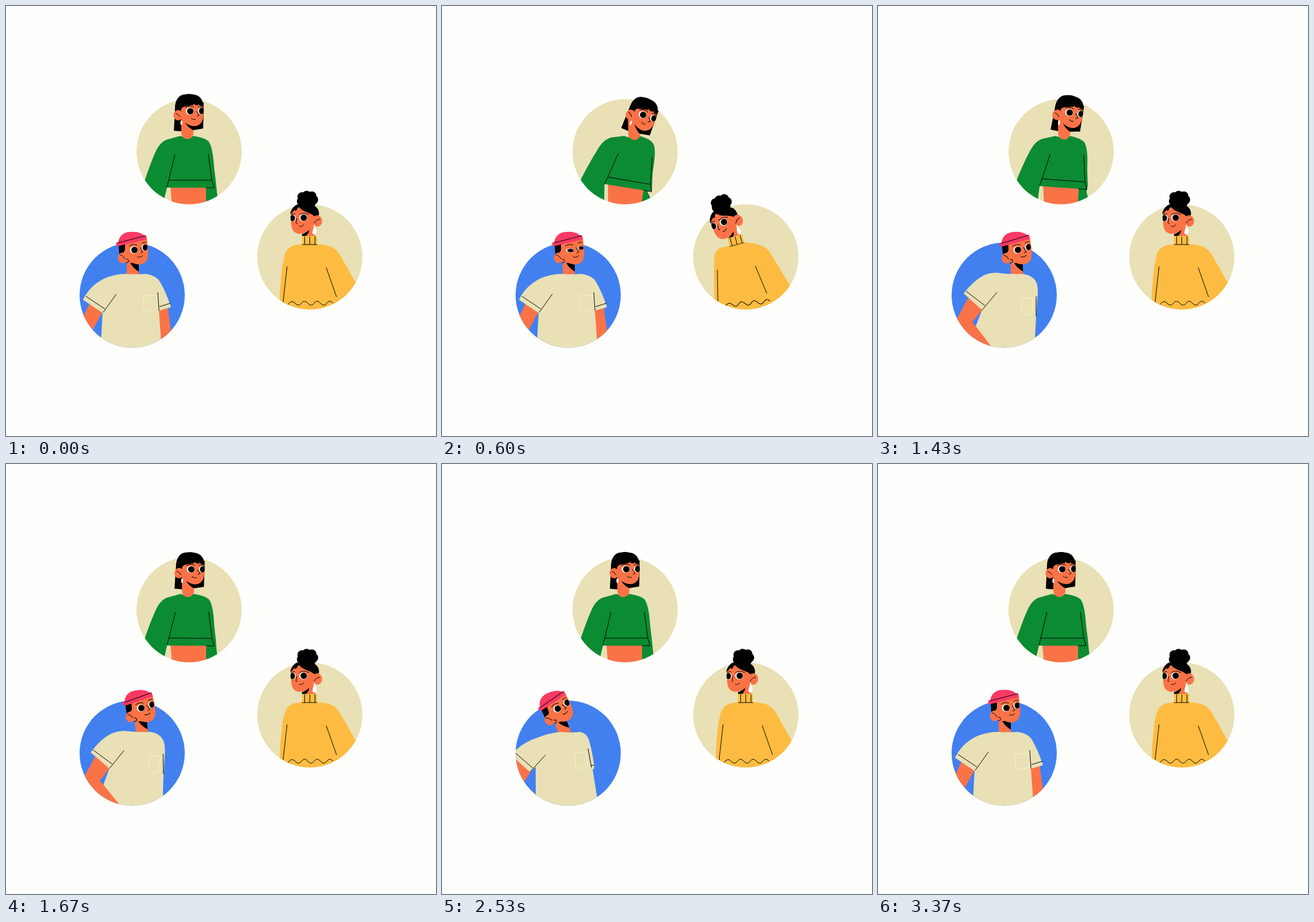
Write an HTML page with a canvas that moves like this. It is 748 by 748 pixels and loops after 3410 ms.

```html
<!DOCTYPE html>
<html lang="en">
<head>
<meta charset="utf-8">
<title>Three people</title>
<style>
html, body { margin: 0; width: 100%; height: 100%; overflow: hidden; background: #fefefd; }
canvas { display: block; }
</style>
</head>
<body>
<canvas id="stage" width="748" height="748"></canvas>
<script>
const ctx = document.getElementById('stage').getContext('2d');
const LOOP = 3410, RADIUS = 91.5;
const CREAM = '#e9e0b5', GREEN = '#0b8b32', SKIN = '#fa7347', BLUE = '#4280f0',
      PINK = '#fb3a64', YELLOW = '#fdbc41', BLACK = '#000', WHITE = '#fff';

const lerp = (a, b, k) => a + (b - a) * k;

// Eased value of a [time, value] track
function track(keys, t) {
  const i = keys.findIndex(key => key[0] > t);
  if (i < 0) return keys[keys.length - 1][1];
  if (i === 0) return keys[0][1];
  const [t0, a] = keys[i - 1], [t1, b] = keys[i];
  const u = (t - t0) / (t1 - t0);
  return lerp(a, b, u * u * (3 - 2 * u));
}

// Blends two paths that share the same commands
function mix(from, to, k) {
  const ends = to.match(/-?[\d.]+/g);
  let i = 0;
  return from.replace(/-?[\d.]+/g, n => lerp(+n, +ends[i++], k).toFixed(2));
}

// Blends along a row of poses; the position 1.5 lies between poses 1 and 2
function along(poses, p) {
  const i = Math.min(Math.floor(p), poses.length - 2);
  return mix(poses[i], poses[i + 1], p - i);
}

function fill(path, color) {
  ctx.fillStyle = color;
  ctx.fill(new Path2D(path));
}

function line(path, color = BLACK, width = 1) {
  ctx.strokeStyle = color;
  ctx.lineWidth = width;
  ctx.stroke(new Path2D(path));
}

function oval(x, y, rx, ry, color) {
  ctx.fillStyle = color;
  ctx.beginPath();
  ctx.ellipse(x, y, rx, ry, 0, 0, 7);
  ctx.fill();
}

function posed(dx, dy, degrees, px, py, draw) {
  ctx.save();
  ctx.translate(px + dx, py + dy);
  ctx.rotate(degrees * Math.PI / 180);
  ctx.translate(-px, -py);
  draw();
  ctx.restore();
}

// Figures are cut by the lower half of their disc and may rise above it
function portrait(x, y, color, draw) {
  oval(x, y, RADIUS, RADIUS, color);
  ctx.save();
  ctx.beginPath();
  ctx.arc(x, y, RADIUS, 0, Math.PI);
  ctx.lineTo(x - RADIUS, y - 150);
  ctx.lineTo(x + RADIUS, y - 150);
  ctx.clip();
  draw();
  ctx.restore();
}

const blink = (t, ...times) =>
  Math.max(0, ...times.map(time => 1 - Math.abs(t - time) / 110));

// Eye: white x, y, rx, ry, then pupil x and rx
function eyes(face, list, closed, lids) {
  if (closed > 0.85) return line(lids);
  const open = 1 - closed;
  ctx.save();
  ctx.clip(new Path2D(face));
  for (const [x, y, rx, ry, pupil, pr] of list) {
    oval(x, y + closed * 2, rx, ry * open, WHITE);
    oval(pupil, y + closed * 2, pr, 5.5 * open, BLACK);
  }
  ctx.restore();
}

function greenWoman(t) {
  const k = track([[0, 0], [80, -.03], [520, .9], [1070, 1], [1180, 1], [1600, .06], [1900, 0]], t);
  const head = draw => posed(21 * k, 4 * k, 21 * k, 317.5, 215, draw);

  fill(mix('M286 314L348 314L348 350L289 350Z', 'M289 308L352 318L347 350L289 350Z', k), SKIN);
  fill(mix(
    'M303 226Q315 231 326 226Q345 229 352 235C358 242 361 262 362 280L365 305L367 325L369 340L348 343L348 316L280 316L273 345L236 320Q252 270 262 250Q268 238 278 233Z',
    'M318 226Q333 232 345 226Q364 231 369 240C374 248 371 270 367 290L365 324L356 322L365 340L347 343L351 321L283 309L283 345L233 318Q253 279 272 249Q283 230 298 228Z', k), GREEN);
  line(mix(
    'M294 258L283 303L280 315M283 303L358 303M352 257L358 303L362 316L348 316',
    'M308 256L289 297L283 309M289 297L363 311M367 263L363 311L365 324L351 321', k));

  head(() => fill('M292 217L294 178C294 161 303 154 311 154Q318 152 326 154C338 155 344 165 344 178L343 213L318 215L304 218Z', BLACK));
  ctx.lineCap = 'round';
  line(mix('M315.5 198L315.5 221', 'M336 198L336.5 223', k), SKIN, 21);
  ctx.lineCap = 'butt';
  head(() => {
    fill('M311 202Q320 211 343 205L343 213L326 216Q317 212 311 202Z', BLACK);
    fill('M304 170L343 170C344 190 345 201 335 207C327 212 315 207 305 198Z', SKIN);
    eyes('M304 168H344V212H304Z', [[319.7, 183, 6.9, 6.3, 320.6, 5.6], [339, 182.5, 5, 6, 340, 4.3]],
      blink(t, 1110, 1970), 'M313 184q7 4 13 -1M334 183q5 3 9 -1');
    fill('M301 180L305 168L344 168L343 175L336 173L335 170L334 173L328 172L327 167L326 172L311 175Q305 176 304 182Z', BLACK);
    line('M312 177Q319 172 327 176M334 176Q339 174 343 177M331 183L336 190L332 192M322 195Q325 199 330 197');
    oval(299.5, 190, 8.2, 9, SKIN);
    line('M295 187Q299 187 303 193');
    oval(305, 203, 1.6, 4, WHITE);
  });
}

function yellowWoman(t) {
  const k = track([[0, 0], [80, -.05], [520, 1], [650, 1], [960, -.03], [1070, 0]], t);

  posed(-17 * k, 2 * k, -20 * k, 528, 400, () => {
    for (const [x, y] of [[514, 340], [515, 332], [523, 329.5], [532, 330.5], [535, 337], [531, 342], [523, 341]])
      oval(x, y, 8, 8, BLACK);
    fill('M495 362Q495 354 503 347Q512 342 526 344Q544 347 544.5 361Q544 371 537 377L525 384L505 372Z', BLACK);
    fill('M521 383H538V404H521Z', SKIN);
    fill('M515 397Q524 394 529 385L526 395L519 404L515 404Z', BLACK);
    fill('M496 361L501 354L510 350Q515 356 524 359Q531 361 537 366Q539 383 527 390Q517 398 507 396Q497 393 496 380Z', SKIN);
    fill('M494.5 361Q497 350 508 347Q508 354 503 357Q504 352 499 358Z', BLACK);
    eyes('M495 350H540V398H495Z', [[517, 368.3, 6.9, 6.3, 517.8, 5.6], [499.3, 368.8, 4.6, 6, 498.5, 4.2]],
      blink(t, 1070), 'M495 367q4 -3 8 0M511 367q7 -5 14 -1');
    line('M510 363Q518 358 527 363M496 363Q499 360 503 362M506 369L505 375Q503 379 507 378M510 383Q515 385 518 380');
    oval(541.5, 374, 8.5, 10, SKIN);
    line('M536 378Q540 371 546 371');
    fill('M537 380Q533 391 533 395Q537 401 540 395Q540 390 537 380Z', WHITE);
  });

  fill(mix(
    'M515 414L541 414Q560 416 566 419Q575 423 581 433L615 493L600 535L475 535L476 511Q478 460 484 436Q488 419 503 416Z',
    'M500 417L526 411Q545 413 554 416Q565 420 572 431L612 497L600 535L475 535L474 512Q472 460 474 436Q476 422 490 419Z', k), YELLOW);
  line(mix('M489 453L482 515M557 455L575 506', 'M479 459L480 514M545 452L565 500', k));
  posed(2 * k, 0, -5 * k, 530, 517, () =>
    line('M490 520Q497 510 503 517t11 0t11 0t11 0t11 0t11 0t11 0'));
  posed(-15 * k, 0, -15 * k, 528, 415, () => {
    fill('M515 400H541V415H515Z', YELLOW);
    line('M519.5 401V415M528.5 401V415M537.5 401V415M515 415H541');
  });
}

// Poses: upright, leaning right, leaning left, left with raised elbow, upright
const loopPoses = (...poses) => [...poses, poses[0]];
const shirt = loopPoses(
  'M208 466Q226 467 243 466Q262 469 268 480Q279 499 287 524L266 530L271 600L164 600L166 570L168 534L134 511Q146 486 171 474Q190 466 208 466Z',
  'M206 464Q228 467 252 466Q267 468 274 478Q280 488 277 510L275 540L272 600L203 600L170 557L181 529L149 500Q166 478 183 469Q193 464 206 464Z',
  'M205 466Q224 468 240 466Q253 468 257 485Q259 500 263 530L264 535L273 600L210 600L163 568L168 537L130 519Q145 491 166 479Q186 468 205 466Z',
  'M205 466Q224 468 240 466Q253 468 257 485Q264 512 265 530L262 531L273 600L163 600L163 527L153 536L120 506Q140 484 166 476Q186 468 205 466Z');
const seams = loopPoses(
  'M139 505L172 527M192 501L169 533M264 498L266 530M267 523L286 517',
  'M153 496L186 521M207 498L181 529M275 505L275 540M275 540L275 540',
  'M135 513L171 531M186 503L169 537M255 495L262 530M262 530L262 530',
  'M128 503L158 529M180 506L153 536M254 495L260 528M259 524L264 524');
const pocket = loopPoses(
  'M239 504L263 503L263 527L252 531L239 528Z',
  'M251 507L270 509L268 535L259 538L249 533Z',
  'M233 502L253 500L255 526L245 531L235 528Z',
  'M231 502L251 500L253 525L243 530L232 527Z');
const leftArm = loopPoses(
  'M147 514L168 532L151 563L150 620L120 600L132 545Z',
  'M158 505L182 528L164 550L212 605L150 600L138 543Z',
  'M138 522L167 536L154 564L212 600L170 620L125 540Z',
  'M130 512L155 534L143 553L150 620L120 600L115 540Z');
const rightArm = loopPoses(
  'M262 526L281 522L289 580L266 585Z',
  'M250 530L262 526L262 580L255 580Z',
  'M245 530L255 530L258 580L250 580Z',
  'M245 530L255 530L258 580L250 580Z');
const headPose = loopPoses('0 0 0', '21 0 -2', '-13 1 -20', '-11.5 0 -20');

const leaning = t => track([[0, 0], [620, 0], [1020, 1], [1620, 1], [1900, 2],
  [1960, 2], [2350, 3], [2740, 3], [3180, 4]], t);

function beanieMan(t) {
  const p = leaning(t);
  const [dx, dy, turn] = along(headPose, leaning(t + 25)).split(' ').map(Number);

  fill(along(leftArm, p), SKIN);
  fill(along(rightArm, p), SKIN);
  posed(dx, dy, turn, 222, 455, () => {
    fill('M210 436H231V474H210Z', SKIN);
    fill('M216 447H231V462Q222 457 216 447Z', BLACK);
    fill('M196 415L245 404C247 420 250 438 243 445C236 453 221 450 211 441L200 432Z', SKIN);
    fill('M196 416L207 414L207 425Q204 428 203 432L197 431Z', BLACK);
    eyes('M207 405H246V450H207Z', [[222.6, 424.3, 6.9, 6.3, 223.5, 5.6], [241, 420, 5, 6, 242, 4.4]],
      blink(t, 660), 'M216 426q7 3 13 -2M237 421q5 2 8 -1');
    line('M214 418Q220 413 228 416M236 413Q240 410 244 411M233 420L238 428L234 430M228 436Q233 439 238 434');
    oval(203, 438, 8.3, 9.3, SKIN);
    line('M198 433Q203 433 207 440');
    line('M209 441a3 3 0 1 1 0 5');
    fill('M195 412Q197 397 211 393.5Q234 390 243 402L243 406L195 417Z', PINK);
    fill('M191.5 411.5L243 398.5Q245 401 245 406L194 418Q191 415 191.5 411.5Z', PINK);
    line('M195 412L243 399.5');
  });
  fill(along(shirt, p), CREAM);
  line(along(seams, p));
  line(along(pocket, p), '#f7f1cd');
}

function frame(now) {
  const t = now % LOOP;
  ctx.fillStyle = '#fefefd';
  ctx.fillRect(0, 0, 748, 748);
  portrait(318.5, 253.5, CREAM, () => greenWoman(t));
  portrait(528.5, 436.5, CREAM, () => yellowWoman(t));
  portrait(219.5, 503, BLUE, () => beanieMan(t));
  requestAnimationFrame(() => frame(performance.now() - start));
}

const start = performance.now();
frame(0);
</script>
</body>
</html>
```
